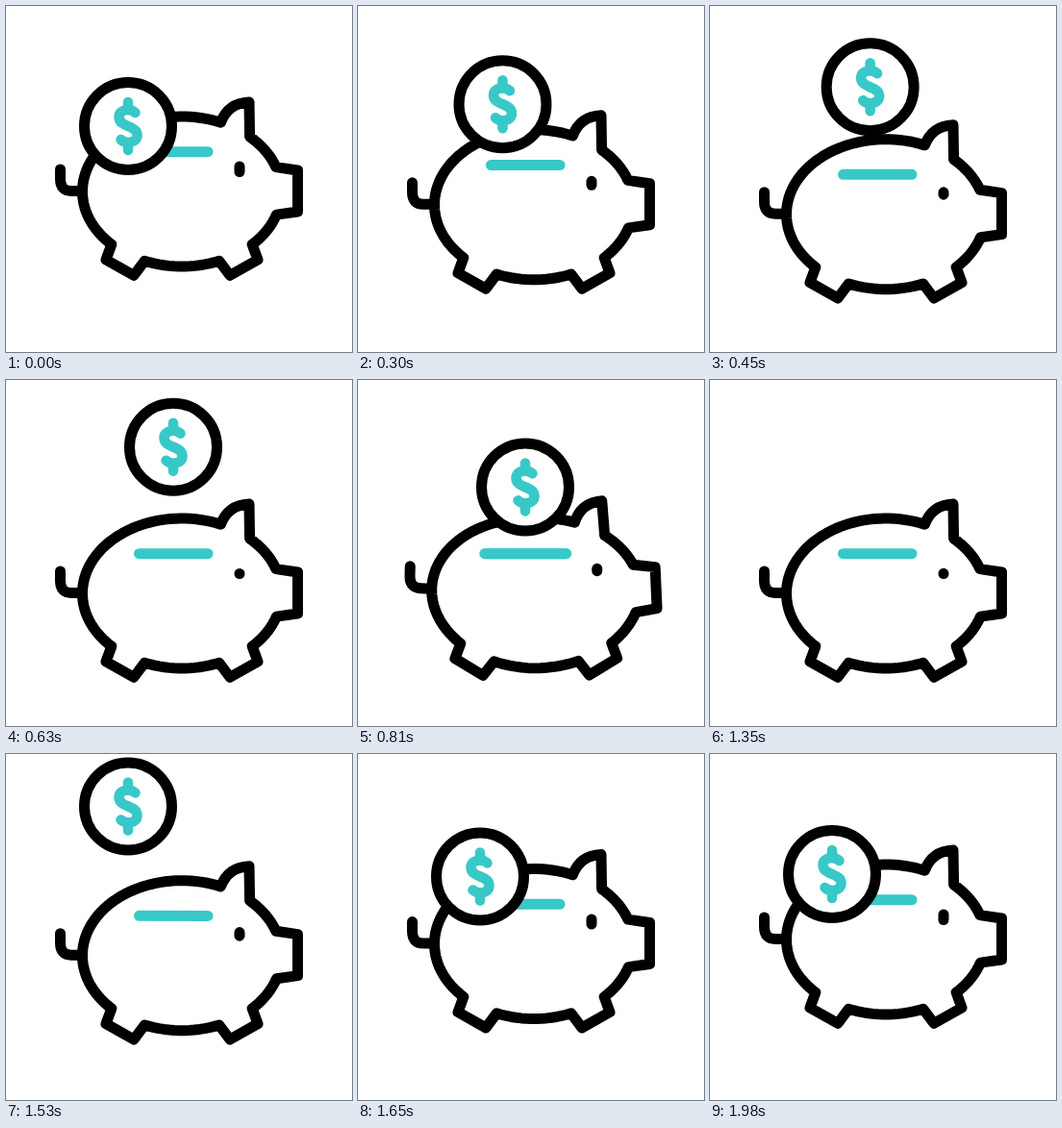
These frames come from a looping animation (360x360 px, 2250 ms). An HTML page with a canvas:

```html
<!DOCTYPE html>
<html lang="en">
<head>
<meta charset="utf-8">
<title>Piggy bank</title>
<style>
html, body { margin: 0; width: 100%; height: 100%; overflow: hidden; background: #fff; }
canvas { display: block; width: 360px; height: 360px; }
</style>
</head>
<body>
<canvas id="stage" width="360" height="360"></canvas>
<script>
const ctx = document.getElementById('stage').getContext('2d');
const LOOP = 2250, STEP = 30;
const BLACK = '#000', TEAL = '#38c8c8';
const BODY = { x: 183, y: 222, rx: 103.5, ry: 78 };
const LOW = 29;        // how far the pig sinks
const SLOT_Y = 180.7;  // slot height while the pig is down

const clamp = v => Math.min(1, Math.max(0, v));
const part = (t, a, b) => clamp((t - a) / (b - a));
const ease = (t, a, b) => { const p = part(t, a, b); return p * p * (3 - 2 * p); };
const mix = (a, b, p) => a + (b - a) * p;

function pen(color, width) {
  ctx.strokeStyle = color;
  ctx.lineWidth = width;
  ctx.lineCap = ctx.lineJoin = 'round';
}

function line(x1, y1, x2, y2) {
  ctx.beginPath();
  ctx.moveTo(x1, y1);
  ctx.lineTo(x2, y2 + 0.01);
  ctx.stroke();
}

// Pushes a point, measured from the body centre, outwards by the bulge k
function warp(x, y, k) {
  const u = (x + 5) / 104;
  const dx = (2.8 + 6.6 * Math.tanh(5 * u)) * ease(y, -122, 28);
  return [x + k * dx, y - k * 5.5 * Math.abs(u)];
}

function drawPig(k, eye) {
  const to = (x, y) => ctx.lineTo(...warp(x, y, k));
  const bend = (cx, cy, x, y) => ctx.quadraticCurveTo(...warp(cx, cy, k), ...warp(x, y, k));
  // Part of the body ellipse, clockwise, in degrees
  const rim = (from, end) => {
    const n = Math.ceil((end - from) / 3);
    for (let i = 0; i <= n; i++) {
      const a = mix(from, end, i / n) * Math.PI / 180;
      to(BODY.rx * Math.cos(a), BODY.ry * Math.sin(a));
    }
  };

  ctx.save();
  ctx.translate(BODY.x, BODY.y);
  pen(BLACK, 11);
  ctx.beginPath();
  rim(-47, -19);
  to(120.5, -22);  // snout
  to(120.5, 21);
  rim(18, 45);
  to(79, 71);      // front foot
  to(50, 87.3);
  rim(68, 112);
  to(-50, 87.3);   // back foot
  to(-79, 71);
  rim(135, 293);
  bend(48, -92, 70, -93);  // ear
  ctx.closePath();
  ctx.stroke();

  ctx.beginPath();  // tail
  ctx.moveTo(...warp(-126.5, -23, k));
  to(-126.5, -13);
  bend(-126.5, -0.5, -115, -0.5);
  to(-105, -0.5);
  ctx.stroke();

  const [x, y] = warp(60, -20.5, k);
  line(x, y - eye, x, y);
  ctx.restore();
}

function drawSlot(k) {
  pen(TEAL, 11);
  line(138.5 - 8 * k, SLOT_Y, 210 + 8 * k, SLOT_Y);
}

function drawCoin(x, y) {
  ctx.save();
  ctx.translate(x, y);
  pen(BLACK, 11);
  ctx.beginPath();
  ctx.arc(0, 0, 45.5, 0, Math.PI * 2);
  ctx.fillStyle = '#fff';
  ctx.fill();
  ctx.stroke();
  // The dollar sign is one half drawn twice, turned by 180 degrees
  pen(TEAL, 10.5);
  for (let half = 0; half < 2; half++) {
    ctx.beginPath();
    ctx.moveTo(0, 0);
    ctx.bezierCurveTo(-5, -2, -9.5, -4, -9.5, -9.5);
    ctx.bezierCurveTo(-9.5, -17.5, 2, -19, 7.5, -14);
    ctx.stroke();
    line(0, -25, 0, -17);
    ctx.rotate(Math.PI);
  }
  ctx.restore();
}

// Streak that grows downwards, then shrinks towards its lower end
function streak(t, x, top, bottom, start) {
  const grow = part(t, start, start + 90), shrink = part(t, start + 90, start + 220);
  if (grow === 0 || shrink === 1) return;
  pen(TEAL, 10);
  line(x, mix(top, bottom, shrink), x, mix(top, bottom, grow));
}

function coinAt(t) {
  if (t < 690) return [mix(127, 174, ease(t, 0, 600)), mix(125, 68.5, ease(t, 0, 690))];
  if (t < 1350) return [174, mix(68.5, 240, part(t, 690, 930) ** 2)];
  return [127, mix(-55, 129.5, ease(t, 1350, 1670)) - 4.5 * ease(t, 1670, 1860)];
}

function draw(t) {
  const sink = ease(t, 0, 620) - ease(t, 1350, 1750);
  const k = 2 * (ease(t, 740, 900) - ease(t, 930, 1110));
  const glance = ease(t, 690, 900) - ease(t, 1020, 1400);
  const eye = 5.5 * Math.sqrt(clamp(1 - sink)) + 4 * glance;
  const swallowed = t >= 690 && t < 1350;

  ctx.fillStyle = '#fff';
  ctx.fillRect(0, 0, 360, 360);
  ctx.save();
  ctx.translate(0, LOW * (sink - 1));
  drawPig(k, eye);
  drawSlot(k);
  ctx.restore();

  ctx.save();
  if (swallowed) {
    ctx.beginPath();
    ctx.rect(0, 0, 360, SLOT_Y);
    ctx.clip();
  }
  drawCoin(...coinAt(t));
  ctx.restore();

  if (swallowed) {
    drawSlot(k);
    streak(t, 160, 70, 110, 850);
    streak(t, 190, 76, 148, 865);
  }
}

function frame(now) {
  draw(Math.floor((now % LOOP) / STEP) * STEP);
  requestAnimationFrame(frame);
}
draw(0);
requestAnimationFrame(frame);
</script>
</body>
</html>
```
